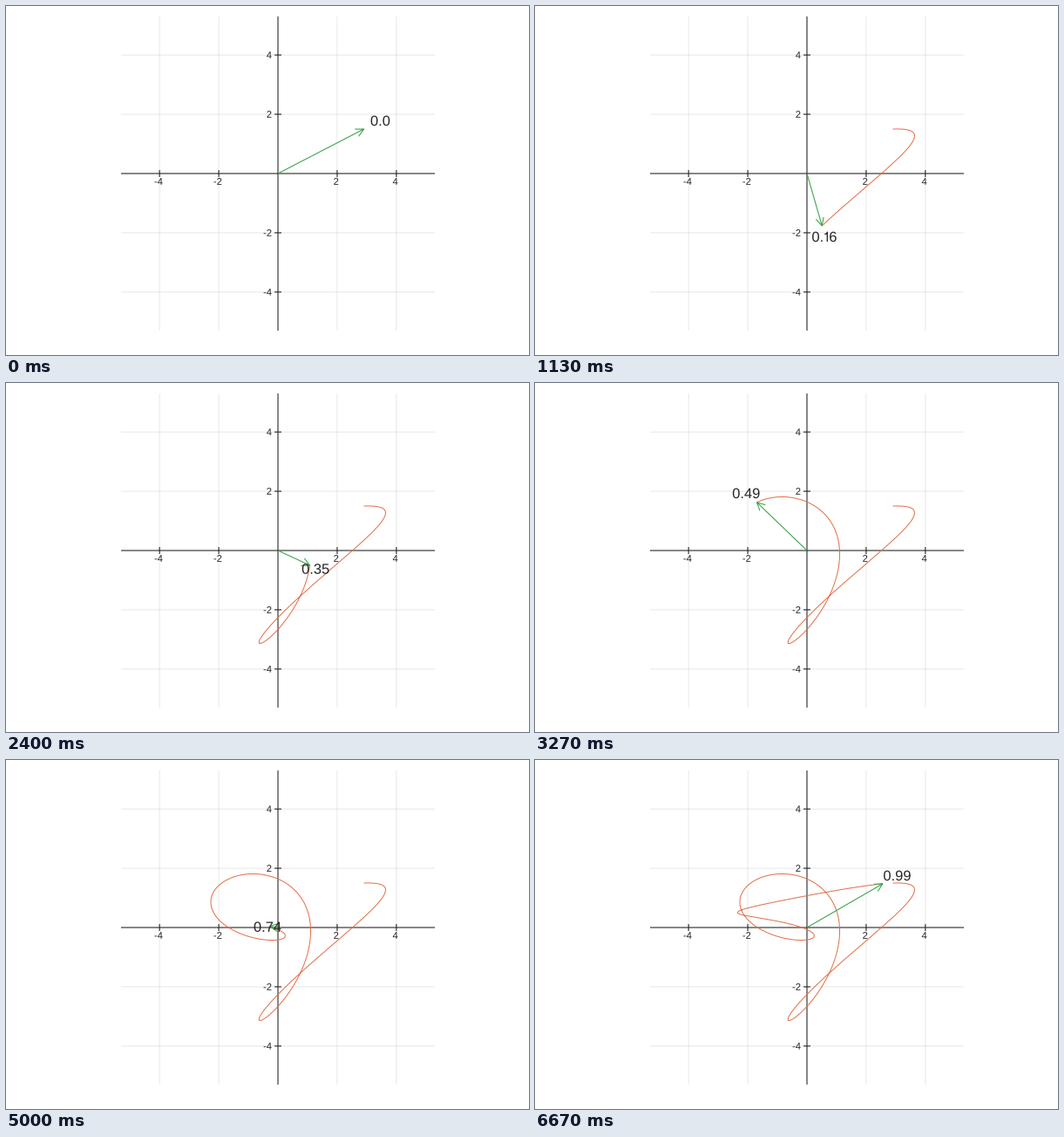
These frames come from a looping animation (600 by 400 pixels, 6.74 s). A matplotlib script:

```python
import numpy as np
import matplotlib.pyplot as plt
from matplotlib.animation import FuncAnimation
from matplotlib.patches import PathPatch
from matplotlib.path import Path
from matplotlib.textpath import TextPath

plt.rcParams["font.family"] = "Liberation Sans"

W, H, DPI = 600, 400, 100
CX, CY = 312, 208            # origin in pixels, y up
HALF = 180                   # half the axis length
UNIT = HALF / 5.3            # pixels per unit
PX = 72 / DPI                # points per pixel
STEPS, LOOP_MS = 100, 6740
GREEN = (0.2422, 0.6433, 0.3044)
ORANGE = (0.8889, 0.4356, 0.2781)
INK = "#262626"

# Rotating vectors: frequency -> coefficient
COEFS = {
    1: 0.1 - 0.5j, -1: 1 + 0.5j,
    2: 0.5j, -2: 0.5 + 1j,
    3: 1 - 0.5j, -3: 0.3 + 0.5j,
}

fig = plt.figure(figsize=(W / DPI, H / DPI), dpi=DPI, facecolor="white")
ax = fig.add_axes([0, 0, 1, 1])
ax.set_xlim(0, W)
ax.set_ylim(0, H)
ax.axis("off")


def curve(t):
    return sum(c * np.exp(2j * np.pi * k * t) for k, c in COEFS.items())


def to_px(z):
    return CX + UNIT * np.real(z), CY + UNIT * np.imag(z)


def glyph(ch, size):
    """Outline and advance of one character; the one is a plain stem with a flag."""
    if ch == "1":
        pts = [(.21, 0), (.29, 0), (.29, .70), (.23, .70),
               (.17, .59), (.06, .56), (.06, .50), (.21, .50), (.21, 0)]
        return Path(np.array(pts) * size, closed=True), .37 * size
    advance = {".": .278, "-": .333}.get(ch, .556)
    return TextPath((0, 0), ch, size=size), advance * size


def text_path(s, x, y, size, align=0.5):
    parts, pen = [], 0
    for ch in s:
        path, advance = glyph(ch, size)
        parts.append(Path(path.vertices + (pen, 0), path.codes))
        pen += advance
    whole = Path.make_compound_path(*parts)
    shift = (x - align * pen, y - 0.345 * size)
    return Path(whole.vertices + shift, whole.codes)


def add_text(*args, **kw):
    patch = PathPatch(text_path(*args, **kw), fc=INK, ec="none", zorder=5)
    return ax.add_patch(patch)


def line(xs, ys, color, width=1.0, **kw):
    return ax.plot(xs, ys, color=color, lw=width * PX, snap=False,
                   solid_capstyle="butt", **kw)[0]


# Grid, axes, ticks and tick labels
for v in (-4, -2, 2, 4):
    gx, gy = CX + v * UNIT, CY + v * UNIT
    line([gx, gx], [CY - HALF, CY + HALF], "black", 0.9, alpha=0.1, zorder=1)
    line([CX - HALF, CX + HALF], [gy, gy], "black", 0.9, alpha=0.1, zorder=1)
    line([gx, gx], [CY - 4, CY + 4], INK, 1.1, zorder=2)
    line([CX - 4, CX + 4], [gy, gy], INK, 1.1, zorder=2)
    add_text(str(v), gx - 1.2, CY - 9, 11.2)
    add_text(str(v), CX - 7, gy, 11.2, align=1)
line([CX, CX], [CY - HALF, CY + HALF], INK, 1.1, zorder=2)
line([CX - HALF, CX + HALF], [CY, CY], INK, 1.1, zorder=2)

trace = line([], [], ORANGE, zorder=3)
arrow = line([], [], GREEN, 1.1, zorder=4)
label = add_text("0.0", CX, CY, 16.5)


def update(n):
    t = n / STEPS
    trace.set_data(*to_px(curve(np.linspace(0, t, 10 * n + 1))))

    z = curve(t)
    back = -z / abs(z) * 10.2 / UNIT
    barbs = [z + back * np.exp(1j * a) for a in np.radians((-27, 27))]
    gap = complex(np.nan, np.nan)
    arrow.set_data(*to_px(np.array([0, z, gap, barbs[0], z, barbs[1]])))

    x, y = to_px(1.2 * z)
    label.set_path(text_path(str(t), x - 0.8, y - 0.6, 16.5))
    return trace, arrow, label


anim = FuncAnimation(fig, update, frames=STEPS + 1,
                     interval=LOOP_MS / (STEPS + 1),
                     repeat=True, repeat_delay=0, blit=False)
plt.show()
```
